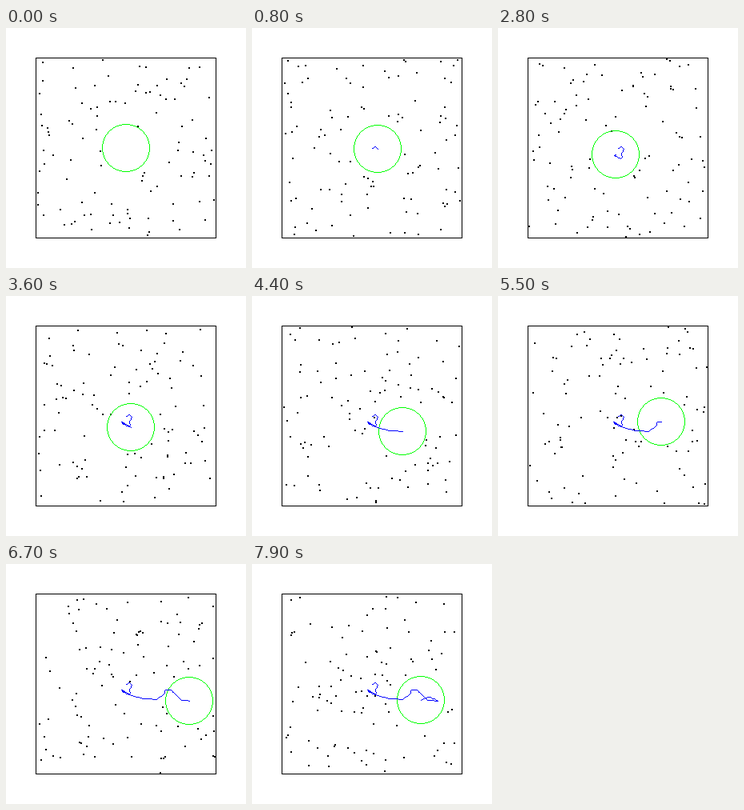
These frames come from a looping animation (300x300 px, 8000 ms). A matplotlib script:

```python
import numpy as np
import matplotlib.pyplot as plt
from matplotlib.animation import FuncAnimation

SIZE, FRAMES, STEP_MS = 300, 80, 100
LOW, HIGH = 37, 262          # box border
RADIUS = 29.5
COUNT, SPEED, SUBSTEPS = 100, 5.0, 5
BLACK, GREEN, BLUE, WHITE = (0, 0, 0), (0, 255, 0), (0, 0, 255), 255

# Key points of the disc's walk, evenly spaced in time
KEY_STEP = 4
WALK = np.array([
    (150, 150), (154, 148), (157, 151), (154, 156), (155, 161), (153, 163),
    (145, 159), (147, 158), (144, 157), (156, 164), (172, 168), (188, 169),
    (197, 162), (199, 157), (206, 157), (211, 162), (219, 170), (232, 171),
    (228, 168), (220, 166), (208, 171),
])


def disc_at(t):
    keys = np.arange(len(WALK)) * KEY_STEP
    return np.array([np.interp(t, keys, axis) for axis in WALK.T])


def start_points(rng):
    points = []
    while len(points) < COUNT:
        p = rng.uniform(LOW + 1, HIGH - 2, 2)
        if np.hypot(*(p - disc_at(0))) > RADIUS + 2:
            points.append(p)
    return np.array(points)


def bounce_disc(pos, vel, centre, drift):
    offset = pos - centre
    dist = np.hypot(offset[:, 0], offset[:, 1])
    hit = dist < RADIUS + 1
    normal = offset[hit] / dist[hit, None]
    approach = np.minimum(((vel[hit] - drift) * normal).sum(1), 0)
    vel[hit] -= 2 * approach[:, None] * normal
    pos[hit] = centre + normal * (RADIUS + 1)


def bounce_walls(pos, vel):
    low, high = LOW + 1, HIGH - 2
    vel[pos < low] = np.abs(vel[pos < low])
    vel[pos > high] = -np.abs(vel[pos > high])
    np.clip(pos, low, high, out=pos)


def simulate():
    rng = np.random.default_rng(7)
    pos = start_points(rng)
    angle = rng.uniform(0, 2 * np.pi, COUNT)
    vel = SPEED * np.column_stack([np.cos(angle), np.sin(angle)])
    history = [pos.copy()]
    dt = 1 / SUBSTEPS
    for k in range(1, (FRAMES - 1) * SUBSTEPS + 1):
        centre = disc_at(k * dt)
        drift = (centre - disc_at((k - 1) * dt)) / dt
        pos += vel * dt
        bounce_disc(pos, vel, centre, drift)
        bounce_walls(pos, vel)
        if k % SUBSTEPS == 0:
            history.append(pos.copy())
    return np.rint(history).astype(int)


def draw_line(img, a, b, color):
    n = int(np.abs(b - a).max()) + 1
    xs, ys = np.rint(np.linspace(a, b, n)).astype(int).T
    img[ys, xs] = color


def draw_circle(img, centre, color):
    # An even diameter puts the centre between pixels
    x, y = centre - 0.5
    d = np.arange(-21, 21) + 0.5
    e = np.floor(np.sqrt(RADIUS ** 2 - d ** 2)) + 0.5
    for s in (-1, 1):
        img[(y + s * e).astype(int), (x + d).astype(int)] = color
        img[(y + d).astype(int), (x + s * e).astype(int)] = color


def render(i):
    img = np.full((SIZE, SIZE, 3), WHITE, np.uint8)
    img[[LOW, HIGH], LOW:HIGH + 1] = BLACK
    img[LOW:HIGH + 1, [LOW, HIGH]] = BLACK
    for x, y in dots[i]:
        img[y:y + 2, x:x + 2] = BLACK
    draw_circle(img, track[i], GREEN)
    for a, b in zip(track[:i], track[1:i + 1]):
        draw_line(img, a, b, BLUE)
    return img


def update(i):
    picture.set_data(render(i))
    return [picture]


dots = simulate()
track = np.rint([disc_at(i) for i in range(FRAMES)]).astype(int)

fig = plt.figure(figsize=(3, 3), dpi=100, facecolor="white")
ax = fig.add_axes([0, 0, 1, 1])
ax.axis("off")
picture = ax.imshow(render(0), interpolation="nearest", aspect="auto")

anim = FuncAnimation(fig, update, frames=FRAMES, interval=STEP_MS,
                     repeat=True, repeat_delay=0, blit=False)
plt.show()
```
